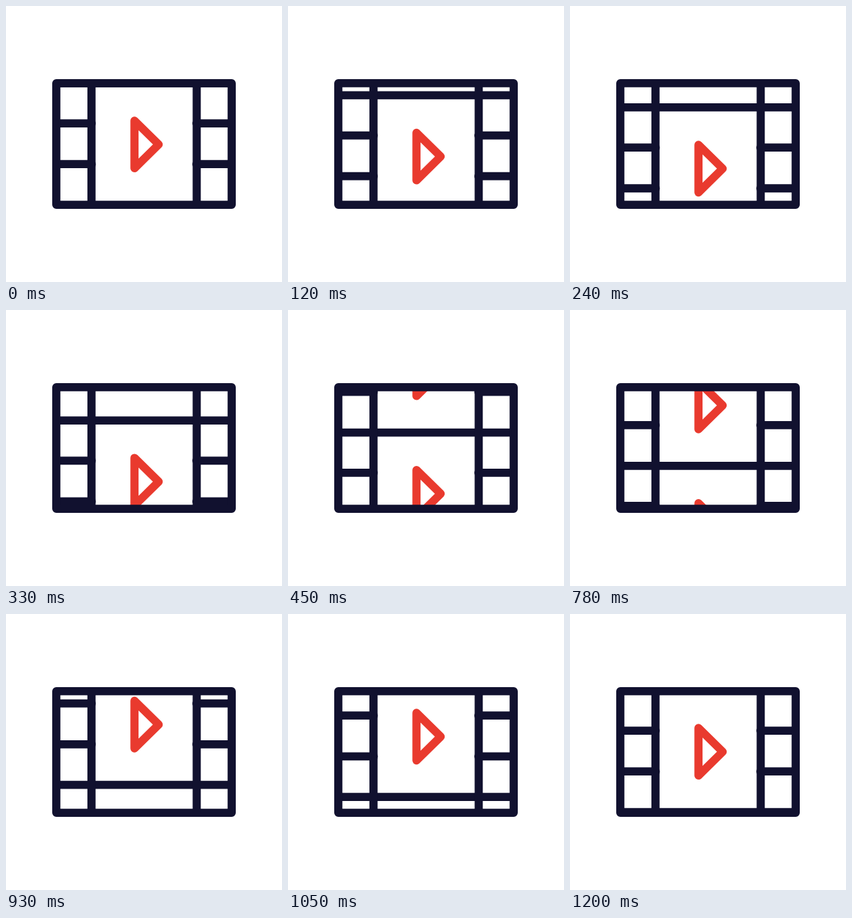
These frames come from a looping animation (400 px wide and 400 px high, 1.26 s). An HTML page with a canvas:

```html
<!DOCTYPE html>
<html lang="en">
<head>
<meta charset="utf-8">
<title>Film strip</title>
<style>
  html, body { margin: 0; width: 100%; height: 100%; overflow: hidden; background: #fff; }
  canvas { display: block; width: 400px; height: 400px; }
</style>
</head>
<body>
<canvas id="stage" width="400" height="400"></canvas>
<script>
const ctx = document.getElementById('stage').getContext('2d');

const NAVY = '#11112f', RED = '#e93a2e';
const LOOP = 1260, STEP = 30, LAST_STEP = 40;
const TRAVEL = 4.38;              // pixels per step
const LEFT = 72.9, RIGHT = 327.1, TOP = 111.9, BOTTOM = 288.1;
const RAIL_LEFT = 123.9, RAIL_RIGHT = 276.4;
const PERIOD = BOTTOM - TOP;      // one film cell
const RUNGS = [58.2, 117.3];      // perforation bars within a cell

function stroke(color, points, closed) {
  ctx.strokeStyle = color;
  ctx.beginPath();
  points.forEach(([x, y]) => ctx.lineTo(x, y));
  if (closed) ctx.closePath();
  ctx.stroke();
}

function drawCell(y) {
  stroke(RED, [[186.2, y + 54.2], [221.3, y + 88.7], [186.2, y + 123.3]], true);
  stroke(NAVY, [[LEFT, y], [RIGHT, y]]);
  for (const rung of RUNGS) {
    stroke(NAVY, [[LEFT, y + rung], [RAIL_LEFT + 0.4, y + rung]]);
    stroke(NAVY, [[RAIL_RIGHT - 0.4, y + rung], [RIGHT, y + rung]]);
  }
}

function draw(time) {
  const step = Math.min(Math.floor((time % LOOP) / STEP), LAST_STEP);
  const y = TOP + step * TRAVEL;

  ctx.fillStyle = '#fff';
  ctx.fillRect(0, 0, 400, 400);
  ctx.lineWidth = 11.8;
  ctx.lineCap = ctx.lineJoin = 'round';

  ctx.save();
  ctx.beginPath();
  ctx.rect(LEFT, TOP, RIGHT - LEFT, PERIOD);
  ctx.clip();
  drawCell(y - PERIOD);
  drawCell(y);
  ctx.restore();

  for (const x of [RAIL_LEFT, RAIL_RIGHT]) stroke(NAVY, [[x, TOP], [x, BOTTOM]]);
  stroke(NAVY, [[LEFT, TOP], [RIGHT, TOP], [RIGHT, BOTTOM], [LEFT, BOTTOM]], true);
}

const start = performance.now();
function tick() {
  draw(performance.now() - start);
  requestAnimationFrame(tick);
}
tick();
</script>
</body>
</html>
```
